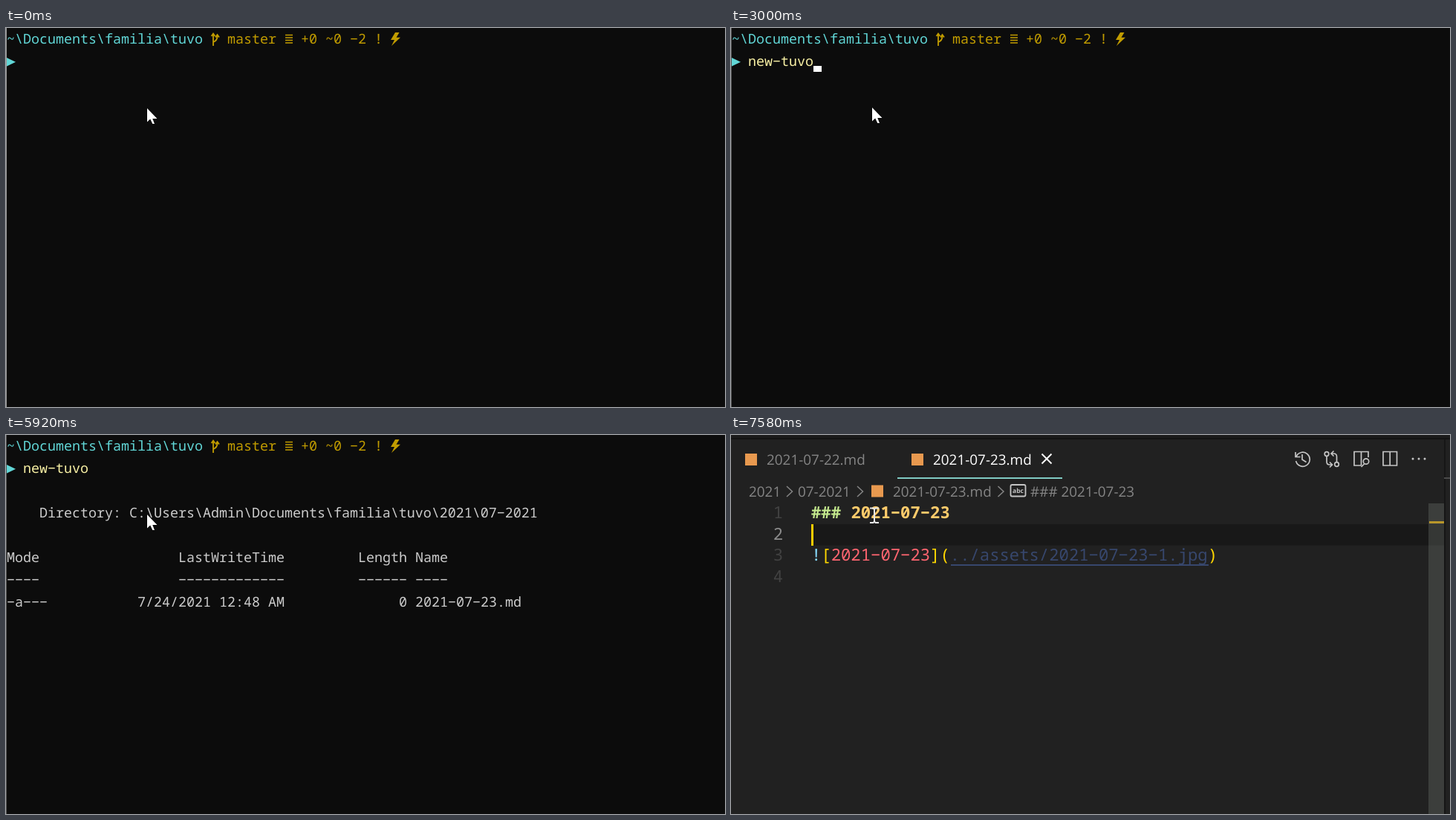
Animation of 968x510 px, one loop 8 s. Source, as an HTML page:

```html
<!DOCTYPE html>
<html lang="en">
<head>
<meta charset="utf-8">
<title>New note from the terminal</title>
<style>
  html, body { margin: 0; width: 100%; height: 100%; overflow: hidden; background: #0c0c0c; }
  svg { display: block; width: 100vw; height: 100vh; }
  text { white-space: pre; text-rendering: geometricPrecision; }
  [hidden] { display: none; }
  .line { fill: none; stroke: currentColor; }

  #term { font: 18.333px "Noto Sans Mono", "DejaVu Sans Mono", monospace; fill: #ccc; }
  #term .path { fill: #61d6d6; }
  #term .git { fill: #c19c00; color: #c19c00; }
  #typed { fill: #f9f1a5; }

  .ui { font: 18.9px "Open Sans", "Noto Sans", sans-serif; fill: #858585; color: #858585; }
  .code { font: 500 22.24px "Noto Sans Mono", "DejaVu Sans Mono", monospace; }
  .code .bold { font-weight: 700; }
  .num { fill: #424242; text-anchor: end; font-weight: 400; }
  .num.on { fill: #8c8c8c; }
  .icons { color: #c5c5c5; fill: none; stroke: #c5c5c5; stroke-width: 1.7; }
  .badge { fill: #e8994f; }
</style>
</head>
<body>
<svg viewBox="0 0 968 510" preserveAspectRatio="none">
  <g id="term">
    <rect width="968" height="510" fill="#0c0c0c"/>
    <rect id="edge" width="1" height="510"/>
    <text class="path" x="1" y="21">~\Documents\familia\tuvo</text>
    <g class="git">
      <path class="line" stroke-width="1.8" d="M279 24V8M276.5 11L279 7.5L281.500 11M279 19Q284.500 17 284.500 11V9M282 12.500L284.500 9L287 12.500"/>
      <path class="line" stroke-width="1.5" d="M376 9.500h10M376 13h10M376 16.500h10M376 20h10"/>
      <path d="M524 6L518 16H523L519 24L531 12.800H525.500L529.500 6Z"/>
      <text y="21"><tspan x="298">master</tspan><tspan x="397">+0 ~0 −2 !</tspan></text>
    </g>
    <path class="path" d="M1 40L13 45.800L1 51.500Z"/>
    <text id="typed" x="23" y="51"></text>
    <g id="output">
      <text x="45" y="111">Directory: C:\Users\Admin\Documents\familia\tuvo\2021\07−2021</text>
      <text y="171"><tspan x="1">Mode</tspan><tspan x="232">LastWriteTime</tspan><tspan x="474">Length Name</tspan></text>
      <text y="201"><tspan x="1">−−−−</tspan><tspan x="232">−−−−−−−−−−−−−</tspan><tspan x="474">−−−−−− −−−−</tspan></text>
      <text y="231"><tspan x="1">−a−−−</tspan><tspan x="177">7/24/2021 12:48 AM</tspan><tspan x="529">0 2021−07−23.md</tspan></text>
    </g>
    <rect id="block" width="11" height="8" fill="#fff"/>
  </g>

  <g id="editor">
    <rect width="968" height="510" fill="#212121"/>
    <rect width="968" height="4" fill="#1b1b1b"/>
    <rect y="4" width="968" height="2" fill="#131313"/>

    <g class="ui">
      <rect class="badge" x="19" y="25" width="16" height="16"/>
      <text x="48" y="40">2021-07-22.md</text>
      <rect class="badge" x="243" y="25" width="16" height="16"/>
      <text id="tabName" x="272" y="40">2021-07-23.md</text>
      <text id="modified" x="411" y="40" fill="#465f96">M</text>
      <path id="close" stroke="#fff" stroke-width="1.9" d="M-6.500 -6.500L6.500 6.500M6.500 -6.500L-6.500 6.500"/>
      <rect id="tabLine" x="224" y="57" height="2" fill="#80cbc4"/>

      <text y="83"><tspan x="24">2021</tspan><tspan x="90">07-2021</tspan><tspan x="218">2021-07-23.md</tspan><tspan x="403">### 2021-07-23</tspan></text>
      <path class="line" stroke-width="1.5" d="M75 69l7.500 7l-7.500 7M170 69l7.500 7l-7.500 7M359.500 69l7.500 7l-7.500 7"/>
      <rect class="badge" x="189" y="67.500" width="16" height="16"/>
      <rect x="376.500" y="67" width="20" height="15.500" rx="2" fill="none" stroke="#c5c5c5" stroke-width="1.8"/>
      <text x="386.500" y="78" text-anchor="middle" style="font-size:8.500px;font-weight:700;fill:#c5c5c5">abc</text>
    </g>

    <g class="icons">
      <path d="M760 23v6.500h6.500M761 29A9.500 9.500 0 1 1 760.500 35M769 26v7l5.500 3.500"/>
      <circle cx="802" cy="25.500" r="2.800"/>
      <circle cx="815.500" cy="39.500" r="2.800"/>
      <path d="M802 28.500V36Q802 40 806 40H809M806 36.500L809.500 40L806 43.500M815.500 36.500V29Q815.500 25 811.500 25H808.500M811.500 21.500L808 25L811.500 28.500"/>
      <path d="M848.500 41H839V22.500H858V30M848.500 22.500V41M852.500 39L848.500 43"/>
      <circle cx="855" cy="35.500" r="3.700"/>
      <path d="M878 22.500H896.500V41H878ZM887.200 22.500V41"/>
      <path stroke-width="3" stroke-linecap="round" d="M918 32h.01M926 32h.01M934 32h.01"/>
    </g>

    <rect id="activeRow" x="108" width="852" height="28.500" fill="#181818"/>
    <g class="code">
      <g id="numbers"></g>
      <text class="bold" x="108" y="112" fill="#c3e88d">### <tspan fill="#ffcb6b">2021−07−23</tspan></text>
      <text x="108" y="169" fill="#ffd700"><tspan fill="#89ddff">!</tspan>[<tspan fill="#ff6570">2021−07−23</tspan>](<tspan fill="#37476d">../assets/2021−07−23−1.jpg</tspan>)</text>
      <rect x="296" y="174" width="347" height="2" fill="#37476d"/>
    </g>
    <rect id="bar" x="108" width="3" height="29" fill="#fc0"/>
    <rect x="939" y="92" width="21" height="418" fill="#a8b2ac" fill-opacity=".2"/>
    <rect id="mark" x="940" width="20" height="3" fill="#b8962a"/>
    <rect x="960" y="6" width="2" height="504" fill="#161616"/>
    <rect x="960" y="57" width="8" height="2" fill="#4a4a4a"/>
  </g>

  <g id="arrow">
    <path fill="#fff" stroke="#000" stroke-width="1" paint-order="stroke" d="M0 0V18.500L4.200 14.500L7.300 21H10L7.300 14H13.500Z"/>
    <circle id="busy" class="line" cx="21" cy="-2" r="5.500" color="#3f9fe0" stroke-width="3"/>
  </g>
  <path id="beam" class="line" color="#e6e6e6" stroke-width="2" d="M187 98.500H191.500L193 100L194.500 98.500H199M193 100V117M187 118H191.500L193 116.500L194.500 118H199"/>
</svg>

<script>
  const LOOP = 8000, OPEN = 6080, SAVED = 6670;
  const $ = id => document.getElementById(id);
  const show = (id, on) => $(id).toggleAttribute('hidden', !on);
  const put = (id, attrs) => {
    for (const name in attrs) $(id).setAttribute(name, attrs[name]);
  };
  // Last entry whose start time has been reached.
  const at = (steps, t) => steps.filter(s => s[0] <= t).pop();
  const within = (t, from, to) => t >= from && t < to;

  // start, typed text, caret on
  const TYPING = [
    [0, '', 0], [250, '', 1], [750, '', 0], [1250, '', 1],
    [1330, 'e', 1], [1420, 'en', 1], [1830, 'e', 0], [1920, '', 1],
    [2080, 'n', 1], [2170, 'ne', 1], [2250, 'new', 1], [2420, 'new−', 1],
    [2670, 'new−t', 1], [2750, 'new−tu', 1], [2920, 'new−tuv', 1], [3000, 'new−tuvo', 1],
    [4000, 'new−tuvo', 0], [4500, 'new−tuvo', 1], [5000, 'new−tuvo', 0]
  ];
  // start, row, caret on
  const ROWS = [[OPEN, 4, 1], [6500, 4, 0], [7000, 4, 1], [7420, 3, 1], [7580, 2, 1]];

  const numbers = [1, 2, 3, 4].map(n => {
    const el = document.createElementNS('http://www.w3.org/2000/svg', 'text');
    el.textContent = n;
    el.setAttribute('x', 70);
    el.setAttribute('y', 112 + (n - 1) * 28.5);
    return $('numbers').appendChild(el);
  });

  function drawTerminal(t) {
    const [, text, caret] = at(TYPING, t);
    const done = t >= 3170;
    $('typed').textContent = text;
    show('output', done);
    show('block', caret);
    put('block', { x: done ? 1 : 23 + 11 * text.length, y: done ? 261 : 51 });
    put('edge', { fill: t < 250 ? '#999' : '#555' });
  }

  function drawEditor(t) {
    const [, row, caret] = at(ROWS, t);
    const saved = t >= SAVED;
    const top = Math.floor(92 + (row - 1) * 28.5);
    show('bar', caret);
    put('bar', { y: top });
    put('activeRow', { y: top });
    put('mark', { y: 64 + row * 26 });
    numbers.forEach((el, i) => el.setAttribute('class', i + 1 === row ? 'num on' : 'num'));
    show('modified', !saved);
    put('tabName', { fill: saved ? '#fff' : '#5470b4' });
    put('close', { transform: `translate(${saved ? 425 : 449} 32)` });
    put('tabLine', { width: saved ? 222 : 246 });
  }

  function frame(now) {
    const t = now % LOOP, editing = t >= OPEN;
    show('term', !editing);
    show('editor', editing);
    (editing ? drawEditor : drawTerminal)(t);
    const beam = t >= 6160;
    show('beam', beam);
    show('arrow', !beam);
    show('busy', within(t, 5750, 5920));
    put('arrow', { transform: `translate(190 ${t < 250 ? 108 : 107})` });
  }

  const start = performance.now();
  const tick = () => {
    frame(performance.now() - start);
    requestAnimationFrame(tick);
  };
  tick();
</script>
</body>
</html>
```
